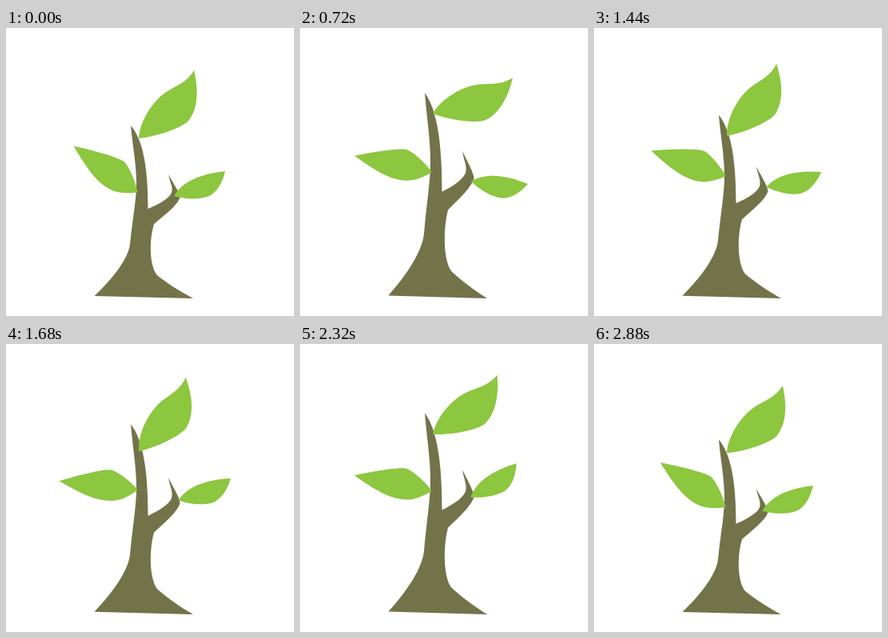
An HTML page for the animation above (2.96 s loop, 360 by 360 pixels).

```html
<!DOCTYPE html>
<html lang="en">
<head>
<meta charset="utf-8">
<title>Growing tree</title>
<style>
  html, body { margin: 0; width: 100%; height: 100%; overflow: hidden; background: #fff; }
  svg { display: block; width: 100%; height: 100%; }
</style>
</head>
<body>
<svg viewBox="0 0 360 360">
  <path id="trunk" fill="#73734a" d="M156 122C158 146 163 170 163 195C163 215 158 240 155 270
    C153 288 134 313 110.500 335L234 338C217 329 203 320 190 310C180 301 178 268 185 245
    C198 234 214 222 217.500 212C217.500 206 209 194 203 183C205 194 209 198 207 206
    C203 214 191 220 177.500 226C177.500 175 171.500 140 156 122Z"/>
  <g fill="#8dc63f">
    <path id="top" d="M0 0C1-20 16-46 35-58.500C48-66.500 61-71 69-85C75-60 74-38 63-23C56-14 24-2.500 0 0Z"/>
    <path id="left" d="M0 0C-2-10-8-27-16-37C-21-43-59-53-80-57.500C-62-27-45-.5-18 1C-10 1.500-4 1.500 0 0Z"/>
    <path id="right" d="M0 0C10-18 34-28 64-31C60-14 52-4 44 0C32 5 14 4 0 0Z"/>
  </g>
</svg>
<script>
const LOOP = 2960, STEP = 80, BEAT = 730;
const GROUND = 338, TRUNK_HEIGHT = 216;
const EVEN = [0, 1, 2, 3];

// Moves at constant speed between turning points, back at the first on beat 4.
function swing(beats, values) {
  const times = [...beats, 4], stops = [...values, values[0]];
  return beat => {
    const next = times.findIndex(time => time > beat);
    if (next < 0) return values[0];
    const part = (beat - times[next - 1]) / (times[next] - times[next - 1]);
    return stops[next - 1] + (stops[next] - stops[next - 1]) * part;
  };
}

const trunkTip = swing(EVEN, [122, 80.5, 109.5, 78.5]);

const topBeats = [0, 1, 2.15, 3];
const leftBeats = [0, 1, 1.6, 2.3, 3];
const leaves = {
  top: {
    x: () => 166,
    y: swing(topBeats, [138, 106.5, 140, 107.5]),
    turn: swing(topBeats, [0, 27.2, -10.3, 10])
  },
  left: {
    x: () => 164.5,
    y: swing(leftBeats, [205, 179.5, 188, 182, 178.5]),
    turn: swing(leftBeats, [0, -24.3, -3, -29.4, -30])
  },
  right: {
    x: beat => 210 + 5.5 * Math.sin(Math.PI * beat / 4),
    y: swing(EVEN, [210, 191.5, 199, 187.5]),
    turn: swing(EVEN, [0, 28.8, 10, -13])
  }
};

function place(id, transform) {
  document.getElementById(id).setAttribute("transform", transform);
}

function draw() {
  const time = Math.floor((performance.now() % LOOP) / STEP) * STEP;
  const beat = time / BEAT;
  const stretch = (GROUND - trunkTip(beat)) / TRUNK_HEIGHT;
  place("trunk", `translate(0 ${GROUND}) scale(1 ${stretch}) translate(0 ${-GROUND})`);
  for (const [id, leaf] of Object.entries(leaves)) {
    place(id, `translate(${leaf.x(beat)} ${leaf.y(beat)}) rotate(${leaf.turn(beat)})`);
  }
  requestAnimationFrame(draw);
}
draw();
</script>
</body>
</html>
```
